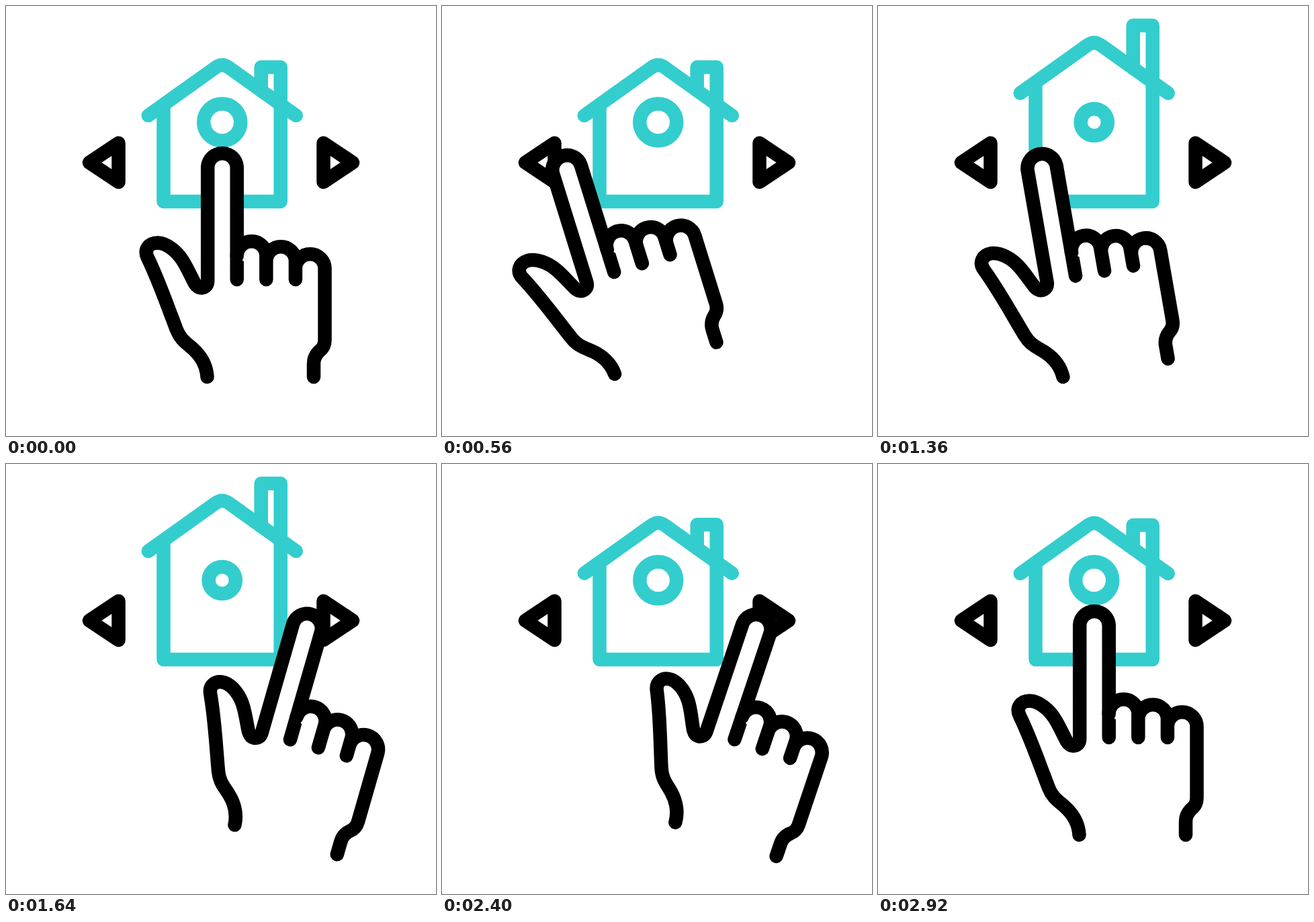
Write an HTML page that moves like this. It is 640 px wide and 640 px high and loops after 3000 ms.

```html
<!DOCTYPE html>
<html lang="en">
<head>
<meta charset="utf-8">
<title>Choosing a house</title>
<style>
  html, body { margin: 0; width: 100%; height: 100%; overflow: hidden; background: #fff; }
  svg { display: block; width: 100%; height: 100%; }
  path, circle { fill: none; stroke: #000; stroke-width: 20.5; stroke-linecap: round; stroke-linejoin: round; }
  .house * { stroke: #33cdce; }
  #hand path { fill: #fff; }
</style>
</head>
<body>
<svg viewBox="0 0 640 640">
  <g class="house">
    <path id="walls"/>
    <path id="roof" d="M211.8 163 L312 91.5 Q321.7 84.5 331.5 91.5 L431.7 163"/>
    <circle id="pane" cx="321.7" cy="173"/>
  </g>
  <path id="left"/>
  <path id="right"/>
  <g id="hand">
    <path d="M299.5 552 C298.5 536 292 523 279 511 C268 501 260 497 254 482
      C240 446 228 410 211 375 C205 363 212 352.5 226 352.5 C240 353 255 366 263 379
      C270 390 275 402 281 413 Q285.5 420 291.5 419.5 Q300.2 418 300.2 409
      V239.5 a21.8 21.8 0 0 1 43.5 0 V407"/>
    <path id="knuckles"/>
  </g>
</svg>
<script>
  const LOOP = 3000, STEP = 40, KNUCKLE = 43.6;

  const [walls, roof, pane, left, right, hand, knuckles] =
    ['walls', 'roof', 'pane', 'left', 'right', 'hand', 'knuckles']
      .map(id => document.getElementById(id));

  // Three folded fingers in a row; the last one runs on down to the wrist.
  const bend = (y, i) =>
    `M${343.7 + KNUCKLE * i} ${y} a${KNUCKLE / 2} ${KNUCKLE / 2} 0 0 1 ${KNUCKLE} 0`;
  knuckles.setAttribute('d', [372, 380, 391].map(bend).join('V407 ') +
    'V497 q0 10 -7.5 16 q-9 8 -9 19 V552');

  // Smooth rise from 0 to 1.
  function ramp(t, start, length) {
    const u = Math.min(1, Math.max(0, (t - start) / length));
    return u * u * (3 - 2 * u);
  }

  // An arrow swells while pressed, keeping its line weight.
  function arrow(el, cx, dir, t, start) {
    const size = 1 + 0.47 * (ramp(t, start, 180) - ramp(t, start + 400, 180));
    const w = 21.75 * size * dir, h = 29 * size;
    el.setAttribute('d', `M${cx - w} ${233 - h} L${cx + w} 233 L${cx - w} ${233 + h} Z`);
  }

  function draw(t) {
    const grown = ramp(t, 705, 546) - ramp(t, 1835, 602);
    const lift = 33.3 * grown;
    walls.setAttribute('d',
      `M234.5 ${147 - lift} V291 H408.7 V${91 - 62 * grown} H379.7 V${126 - lift}`);
    roof.setAttribute('transform', `translate(0 ${-lift})`);
    pane.setAttribute('r', 27.5 - 7.4 * grown);

    arrow(left, 145.75, -1, t, 705);
    arrow(right, 494.25, 1, t, 1724);

    // Swing left, across to the right, then back to the middle.
    const angle = 21 * (2 * ramp(t, 1149, 625) - ramp(t, 165, 540) - ramp(t, 2262, 650));
    hand.setAttribute('transform', `translate(${6.5 * angle} 0) rotate(${angle} 320 320)`);
  }

  function tick(now) {
    const t = now % LOOP;
    draw(t - t % STEP);
    requestAnimationFrame(tick);
  }

  draw(0);
  requestAnimationFrame(tick);
</script>
</body>
</html>
```
